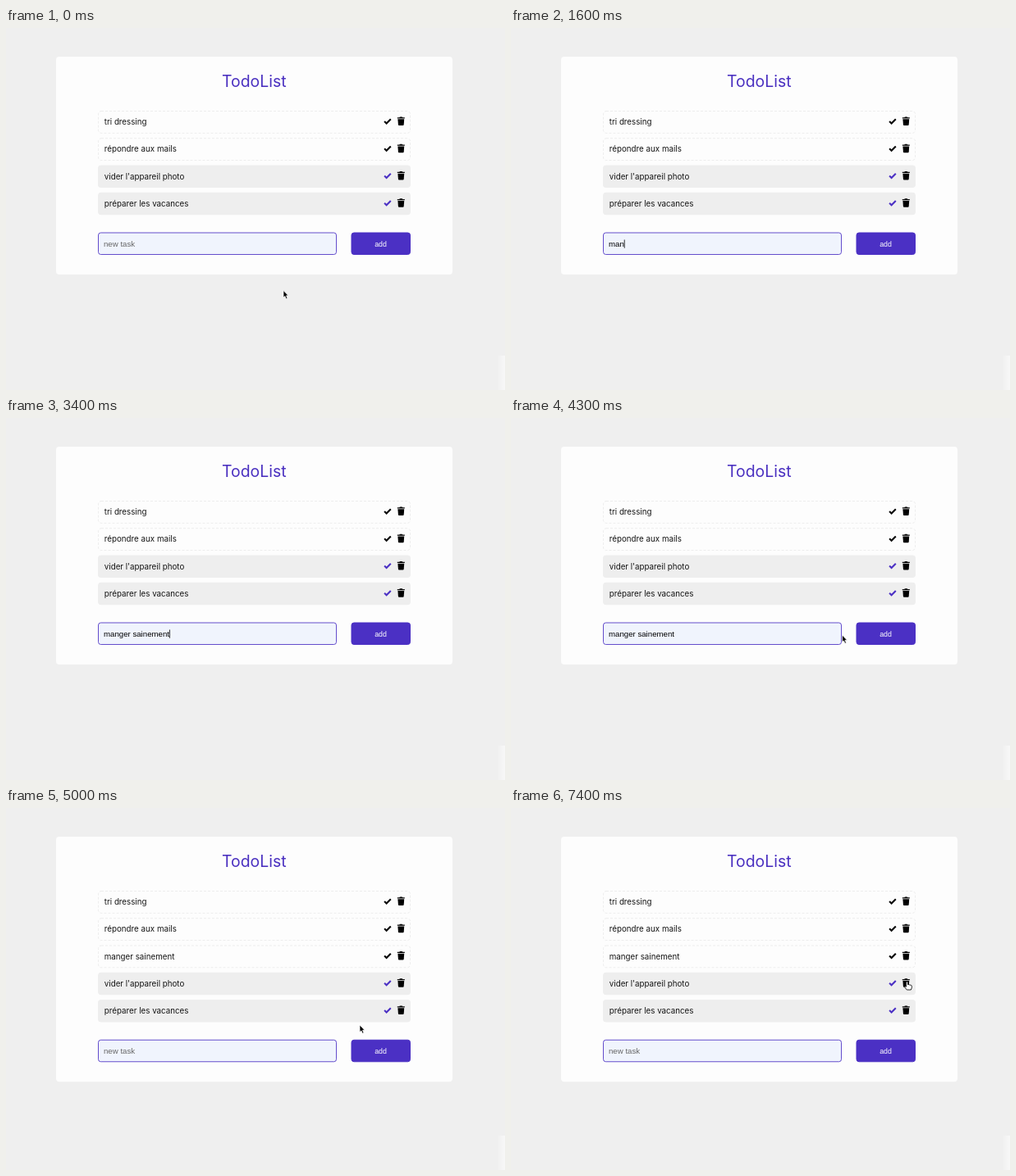
These frames come from a looping animation (608x442 px, 8000 ms). An HTML page:

```html
<!DOCTYPE html>
<html lang="fr">
<head>
<meta charset="utf-8">
<title>TodoList</title>
<style>
  html, body { margin: 0; width: 100%; height: 100%; overflow: hidden; background: #efefef; }
  svg { display: block; width: 608px; height: 442px; }
  text { white-space: pre; }
  .title { font: 19.4px Inter, sans-serif; fill: #4a30c0; text-anchor: middle; }
  .task { font: 9.78px Inter, sans-serif; fill: #151515; }
  .field { font: 9.66px "Liberation Sans", Arial, sans-serif; fill: #000; }
  .hint { fill: #666; }
  .add { font: 8.8px "Liberation Sans", Arial, sans-serif; text-anchor: middle; }
</style>
</head>
<body>
<svg viewBox="0 0 608 442">
  <defs>
    <linearGradient id="glow">
      <stop offset="0" stop-color="#fff" stop-opacity="0"/>
      <stop offset="1" stop-color="#fff" stop-opacity=".55"/>
    </linearGradient>
    <g id="check">
      <path d="M-3.7 .1L-1.2 2.5L4 -2.7" fill="none" stroke="currentColor" stroke-width="2.1"/>
    </g>
    <g id="trash">
      <path d="M-4.5 -4.5H-2L-1.4 -5.3H1.4L2 -4.5H4.5V-3.2H-4.5Z"/>
      <path d="M-3.9 -2.5H3.9L3.4 4.2Q3.3 5.2 2.4 5.2H-2.4Q-3.3 5.2 -3.4 4.2Z"/>
    </g>
    <path id="arrow" d="M0 0V8.6L1.9 6.9L3.4 10.2L4.9 9.5L3.5 6.3H6Z"
      fill="#000" stroke="#fff" stroke-width=".7"/>
    <path id="beam" d="M-2 -4.6Q0 -4.6 0 -3.4Q0 -4.6 2 -4.6M0 -3.6V3.6M-2 4.6Q0 4.6 0 3.4Q0 4.6 2 4.6M-1 1.4H1"
      fill="none" stroke="#222" stroke-width="1"/>
    <path id="hand" d="M-1 .8Q0 -.8 1 .8V3.8Q2 3 2.7 4Q3.7 3.3 4.4 4.4Q5.6 4 5.8 5.4V7.6L4.8 10H-.2L-3 6.6Q-3.2 5 -1 6.2Z"
      fill="#fff" stroke="#111" stroke-width=".9" stroke-linejoin="round"/>
  </defs>
  <rect width="608" height="442" fill="#efefef"/>
  <rect x="598" y="400" width="10" height="42" fill="url(#glow)"/>
  <g id="scene"></g>
</svg>
<script>
const LOOP = 8000, TICK = 100, ADDED = 5000, ROW = 33.25;
const PURPLE = '#4b30c4';
const TYPED = 'manger sainement';
const OPEN = ['tri dressing', 'répondre aux mails'];
const DONE = ["vider l'appareil photo", 'préparer les vacances'];

// moments at which one more letter appears
const KEYS = [1300, 1500, 1600, 1700, 1800, 1900, 2000, 2100,
  2300, 2400, 2600, 3000, 3100, 3200, 3400, 3400];

// pointer moves: start, number of ticks, destination
const START = [338, 320.5];
const MOVES = [
  [100, 6, [292.5, 265]],
  [3900, 7, [431, 265]],
  [6600, 9, [482.5, 212]]
];

const scene = document.getElementById('scene');
const pen = document.createElement('canvas').getContext('2d');
pen.font = '9.66px "Liberation Sans", Arial, sans-serif';

const between = (t, a, b) => t >= a && t < b;
const ease = p => p * p * (3 - 2 * p);

function pointer(t) {
  let at = START;
  for (const [start, ticks, to] of MOVES) {
    if (t < start) break;
    const p = ease(Math.min(1, ((t - start) / TICK + 1) / ticks));
    at = at.map((v, i) => v + (to[i] - v) * p);
  }
  return at;
}

function box(x, y, w, h, r, style) {
  return `<rect x="${x}" y="${y}" width="${w}" height="${h}" rx="${r}" ${style}/>`;
}

function label(x, y, kind, text, extra = '') {
  return `<text x="${x}" y="${y}" class="${kind}" ${extra}>${text}</text>`;
}

function task(text, row, done) {
  const y = 101.3 + row * ROW;
  const style = done ? 'fill="#eee"'
    : 'fill="none" stroke="#ededed" stroke-dasharray="3 2"';
  const frame = done ? box(112, y - .3, 381, 27.4, 4, style)
    : box(112.5, y + .2, 380, 26.8, 3.5, style);
  return frame + label(119.8, y + 16.7, 'task', text) +
    `<use href="#check" x="464.8" y="${y + 12.7}" color="${done ? PURPLE : '#000'}"/>` +
    `<use href="#trash" x="481.3" y="${y + 12.4}"/>`;
}

function field(t, y) {
  const text = t < ADDED ? TYPED.slice(0, KEYS.filter(k => k <= t).length) : '';
  const caret = between(t, 800, 3900) || between(t, 4400, 4800);
  let out = box(112.5, y + .5, 290, 26.5, 3, `fill="#f0f4fd" stroke="${PURPLE}" stroke-opacity=".85"`);
  out += label(119, y + 17.3, text ? 'field' : 'field hint', text || 'new task');
  if (caret) {
    const x = 119 + pen.measureText(text).width;
    out += box(x, y + 9, .8, 10.2, 0, 'fill="#000"');
  }
  return out;
}

function button(y, hover) {
  return box(421, y + .5, 71.5, 26.5, 3, `fill="${hover ? '#fdfdfd' : PURPLE}" stroke="${PURPLE}"`) +
    label(456.5, y + 17, 'add', 'add', `fill="${hover ? PURPLE : '#fff'}"`);
}

function cursor(t, x, y, fieldY) {
  if (between(t, 1300, 3900)) return '';
  const inField = between(x, 112, 403) && between(y, fieldY, fieldY + 27);
  const onTrash = x > 477 && y < 221;
  const shape = inField ? 'beam' : onTrash ? 'hand' : 'arrow';
  return `<use href="#${shape}" x="${x}" y="${y}"/>`;
}

function draw(t) {
  const open = t < ADDED ? OPEN : [...OPEN, TYPED];
  const grow = t < ADDED ? 0 : ROW;
  const y = 249.5 + grow;
  const [px, py] = pointer(t);
  const hover = between(px, 421, 493) && between(py, y, y + 27);
  scene.innerHTML = box(61, 35, 483, 266 + grow, 4, 'fill="#fdfdfd"') +
    label(302.3, 72.4, 'title', 'TodoList') +
    open.map((s, i) => task(s, i, false)).join('') +
    DONE.map((s, i) => task(s, i + open.length, true)).join('') +
    field(t, y) + button(y, hover) + cursor(t, px, py, y);
}

let shown = -1;
function play() {
  const t = Math.floor(performance.now() % LOOP / TICK) * TICK;
  if (t !== shown) draw(shown = t);
  requestAnimationFrame(play);
}
play();
</script>
</body>
</html>
```
